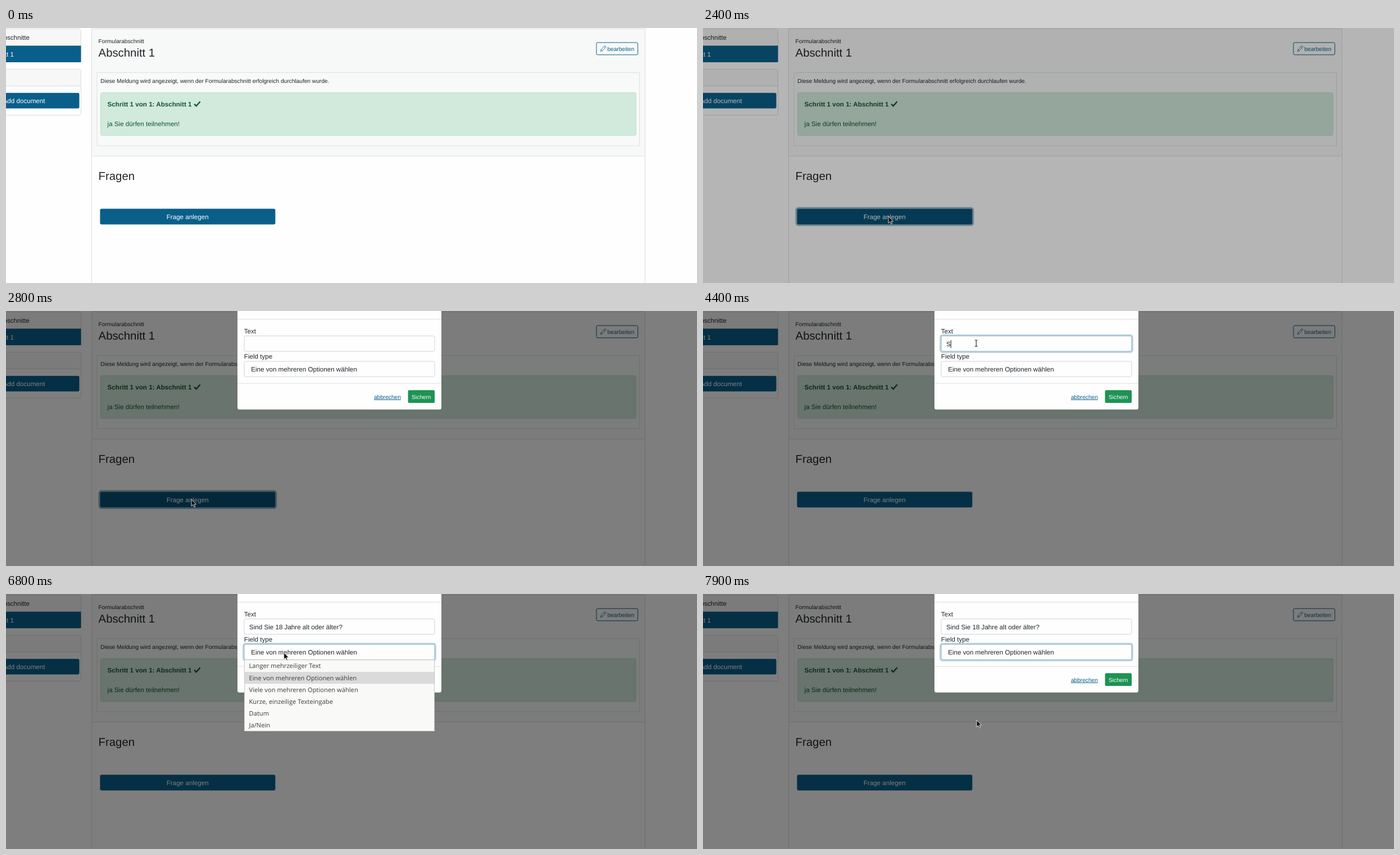
Recreate the animation shown at these times as an HTML page. Size 1230 by 455 pixels, loop 8000 ms.

```html
<!DOCTYPE html>
<html lang="de">
<head>
<meta charset="utf-8">
<title>Frage anlegen</title>
<style>
  html, body { margin: 0; height: 100%; overflow: hidden; background: #fefefe; }
  svg { display: block; width: 100vw; height: 100vh; }
  text { font: 11.62px "Liberation Sans", Arial, sans-serif; fill: #212529; text-rendering: geometricPrecision; white-space: pre; }
  .small { font-size: 10.16px; }
  .big { font-size: 20.33px; }
  .light { fill: #fff; }
  .ok { fill: #125434; }
  .link { fill: #0a5f8a; }
  .end { text-anchor: end; }
  .mid { text-anchor: middle; }
  .btn { fill: #0a5f8a; }
  .card { fill: #fefefe; stroke: #dedede; }
  .head { fill: #f7f7f7; }
  .field { fill: #fefefe; stroke: #ced4da; }
  .field.on { stroke: #84afc5; }
  .ring { fill: none; stroke: #0a5f8a; stroke-width: 3; stroke-opacity: .25; }
  .list text { font: 11.2px "Open Sans", "Noto Sans", sans-serif; fill: #3d3d3d; }
  .list .frame { fill: #f9f9f8; stroke: #c8c8c8; }
  .list .bar { fill: #dadada; }
</style>
</head>
<body>
<svg viewBox="0 0 1230 455" preserveAspectRatio="none">
  <!-- sidebar -->
  <rect class="card" x="-20" y="1.5" width="153.5" height="59.5" rx="2.7"/>
  <rect class="head" x="-20" y="2" width="153" height="29.5"/>
  <rect class="btn" x="-20" y="31.5" width="153.5" height="29.5"/>
  <text class="end" x="42" y="21">Formularabschnitte</text>
  <text class="end light" x="14" y="51">Abschnitt 1</text>
  <rect class="card" x="-20" y="73.5" width="153.5" height="82" rx="2.7"/>
  <rect class="head" x="-20" y="74" width="153" height="29"/>
  <path d="M0 103.5H133" stroke="#dedede"/>
  <rect class="btn" x="-20" y="115.7" width="150.5" height="27.8" rx="2.7"/>
  <text class="end light" x="69.5" y="134">Add document</text>

  <!-- section -->
  <rect class="card" x="152.5" y="1.5" width="985" height="470"/>
  <rect x="153" y="2" width="984" height="226" fill="#f7f9f8"/>
  <path d="M153 228.3H1137" stroke="#dedede"/>
  <text class="small" x="164.6" y="27">Formularabschnitt</text>
  <text class="big" x="164.6" y="51">Abschnitt 1</text>
  <rect x="1051" y="26" width="73.7" height="21.8" rx="2.2" fill="none" stroke="#0a5f8a"/>
  <path d="M1058.4 41.6l.8-3.2 6.3-6.3q.8-.6 1.5 0l.7.7q.6.7 0 1.5l-6.3 6.3zM1064.3 33.3l2.3 2.3M1059.2 38.4l2.3 2.3" fill="none" stroke="#0a5f8a" stroke-width=".8"/>
  <text class="small link" x="1070.4" y="41">bearbeiten</text>
  <rect x="162" y="79.7" width="965.7" height="130.3" fill="#f8faf9" stroke="#dedede"/>
  <text class="small" x="168.3" y="98.4">Diese Meldung wird angezeigt, wenn der Formularabschnitt erfolgreich durchlaufen wurde.</text>
  <rect x="168.5" y="115.3" width="952.8" height="76.5" rx="2.7" fill="#d1eadb" stroke="#bcdfca"/>
  <text class="ok" x="180.6" y="139.7" font-weight="bold" style="font-weight:bold">Schritt 1 von 1: Abschnitt 1</text>
  <path d="M335.2 135.6l3.4 3.6 7-8" fill="none" stroke="#125434" stroke-width="2.4"/>
  <text class="ok" x="180.6" y="174.6">ja Sie dürfen teilnehmen!</text>
  <text class="big" x="164.6" y="271">Fragen</text>
  <rect id="addRing" x="166" y="321" width="314.8" height="30.8" rx="4" fill="none" stroke="#2f779c" stroke-width="3" stroke-opacity=".5"/>
  <rect id="add" x="167.4" y="322.4" width="312" height="28" rx="2.7"/>
  <text class="mid light" x="323.2" y="341">Frage anlegen</text>

  <rect id="shade" width="1230" height="455"/>

  <!-- dialog -->
  <g id="dialog">
    <rect x="412" y="-60" width="363" height="235.7" rx="3.5" fill="#fefefe"/>
    <path d="M412 14.6H775M412 129.2H775" stroke="#dedede"/>
    <text x="423.8" y="40">Text</text>
    <rect id="inRing" class="ring" x="422.5" y="43" width="342" height="30.4" rx="4"/>
    <rect id="input" class="field" x="424" y="44.5" width="339" height="27.4" rx="2.7"/>
    <text id="value" x="433" y="62.5"></text>
    <path id="caret" d="M0 52V66" stroke="#111"/>
    <text x="423.8" y="85.2">Field type</text>
    <rect id="selRing" class="ring" x="422.5" y="88.4" width="342" height="30.4" rx="4"/>
    <rect id="select" class="field" x="424" y="89.9" width="339" height="27.4" rx="2.7"/>
    <text x="436.2" y="107.8">Eine von mehreren Optionen wählen</text>
    <text class="small link" x="654.9" y="156.8" text-decoration="underline">abbrechen</text>
    <rect x="715.6" y="141.3" width="47.5" height="22.8" rx="2.2" fill="#1e9353"/>
    <text class="small mid light" x="739.3" y="156.8">Sichern</text>
  </g>

  <g id="hint" class="list">
    <rect class="frame" x="424.5" y="72.5" width="338" height="17.5"/>
    <rect id="hintBar" class="bar" x="425" y="73" width="337" height="16.5"/>
    <text x="432.5" y="85.5">Sind Sie 18 Jahre alt oder älter?</text>
  </g>
  <g id="menu" class="list">
    <rect class="frame" x="424.5" y="117.5" width="338" height="127"/>
    <rect id="menuBar" class="bar" x="425" width="337" height="21.1"/>
  </g>

  <g id="cursor">
    <path id="arrow" d="M0 0V12.2L2.9 9.6 4.8 13.9 6.7 13.1 4.9 8.9H8.6Z" fill="#111" stroke="#fff" stroke-width=".8"/>
    <path id="hand" d="M2.2 1Q3.3 0 4.2 1V5L9 6Q10.3 6.4 10.2 8L9.4 11.3V14H3.4V12L.2 8.4Q-.3 7.2 1 7L2.2 8Z" fill="#fff" stroke="#222" stroke-width=".8"/>
    <path id="beam" d="M-2.5-5.8Q0-5.8 0-4.6Q0-5.8 2.5-5.8M0-5V5M-2.5 5.8Q0 5.8 0 4.6Q0 5.8 2.5 5.8" fill="none" stroke="#222" stroke-width="1.1"/>
  </g>
</svg>
<script>
const LOOP = 8000, STEP = 100, ROW = 21.1, TOP = 118;
const QUESTION = 'Sind Sie 18 Jahre alt oder älter?';
const OPTIONS = ['Langer mehrzeiliger Text', 'Eine von mehreren Optionen wählen', 'Viele von mehreren Optionen wählen',
  'Kurze, einzeilige Texteingabe', 'Datum', 'Ja/Nein'];

// pointer: time, x, y, shape
const TRACK = [
  [0, 0, 0, ''], [800, 168, 121, 'arrow'], [900, 190, 205, 'arrow'], [1000, 232, 290, 'arrow'],
  [1100, 280, 372, 'arrow'], [1200, 312, 387, 'arrow'], [1300, 329, 338, 'arrow'], [1500, 329, 334.5, 'hand'],
  [2400, 330, 336, 'arrow'], [2900, 352, 290, 'arrow'], [3000, 420, 170, 'arrow'], [3100, 478, 86, 'arrow'],
  [3300, 485, 74, 'arrow'], [3400, 486.3, 57.5, 'beam'], [4500, 0, 0, ''], [5200, 486, 85, 'arrow'],
  [5300, 486, 80, 'arrow'], [5400, 486, 75, 'arrow'], [6200, 490, 84, 'arrow'], [6300, 493, 97, 'arrow'],
  [6600, 493, 103, 'arrow'], [6800, 494.6, 104.5, 'arrow'], [7000, 495, 122, 'arrow'], [7100, 493, 148, 'arrow'],
  [7200, 490, 182, 'arrow'], [7300, 488, 209, 'arrow'], [7500, 487, 224, 'arrow'], [7700, 487, 225, 'arrow'],
];

const $ = id => document.getElementById(id);
const set = (id, name, v) => $(id).setAttribute(name, v);
const fade = (id, v) => { $(id).style.opacity = v; };
const clamp = v => Math.max(0, Math.min(1, v));
const within = (t, a, b) => t >= a && t < b;

OPTIONS.forEach((label, i) => {
  const row = document.createElementNS('http://www.w3.org/2000/svg', 'text');
  row.textContent = label;
  row.setAttribute('x', 432.5);
  row.setAttribute('y', TOP + 14.4 + i * ROW);
  $('menu').append(row);
});

function typed(t) {
  if (t >= 5700) return QUESTION;
  return t < 4400 ? '' : QUESTION.slice(0, Math.min(3, (t - 4300) / 100));
}

function draw(t) {
  const [, x, y, shape] = TRACK.findLast(k => k[0] <= t);
  set('cursor', 'transform', `translate(${x} ${y})`);
  for (const s of ['arrow', 'hand', 'beam']) fade(s, +(s === shape));

  const pressed = within(t, 2300, 2900);
  set('add', 'fill', pressed || shape === 'hand' ? '#085075' : '#0a5f8a');
  fade('addRing', pressed ? clamp((t - 2250) / 150) : 0);

  fade('shade', .5 * clamp((t - 2300) / 172));
  const slide = 1 - clamp((t - 2460) / 300);
  fade('dialog', clamp((t - 2460) / 150));
  set('dialog', 'transform', `translate(0 ${-36 * slide * slide})`);

  const inInput = within(t, 3500, 6400), inSelect = t >= 6400;
  $('input').classList.toggle('on', inInput);
  $('select').classList.toggle('on', inSelect);
  fade('inRing', inInput ? clamp((t - 3430) / 150) : 0);
  fade('selRing', clamp((t - 6330) / 150));

  $('value').textContent = typed(t);
  fade('caret', +inInput);
  set('caret', 'transform', `translate(${433.5 + $('value').getComputedTextLength()} 0)`);

  fade('hint', +within(t, 4500, 6000));
  fade('hintBar', +within(t, 5200, 6000));
  fade('menu', +within(t, 6500, 7900));
  set('menuBar', 'y', TOP + ROW * (y < TOP ? 1 : Math.min(5, Math.floor((y - TOP) / ROW))));
}

const start = performance.now();
function tick() {
  const t = (performance.now() - start) % LOOP;
  draw(Math.floor(t / STEP) * STEP);
  requestAnimationFrame(tick);
}
tick();
</script>
</body>
</html>
```
